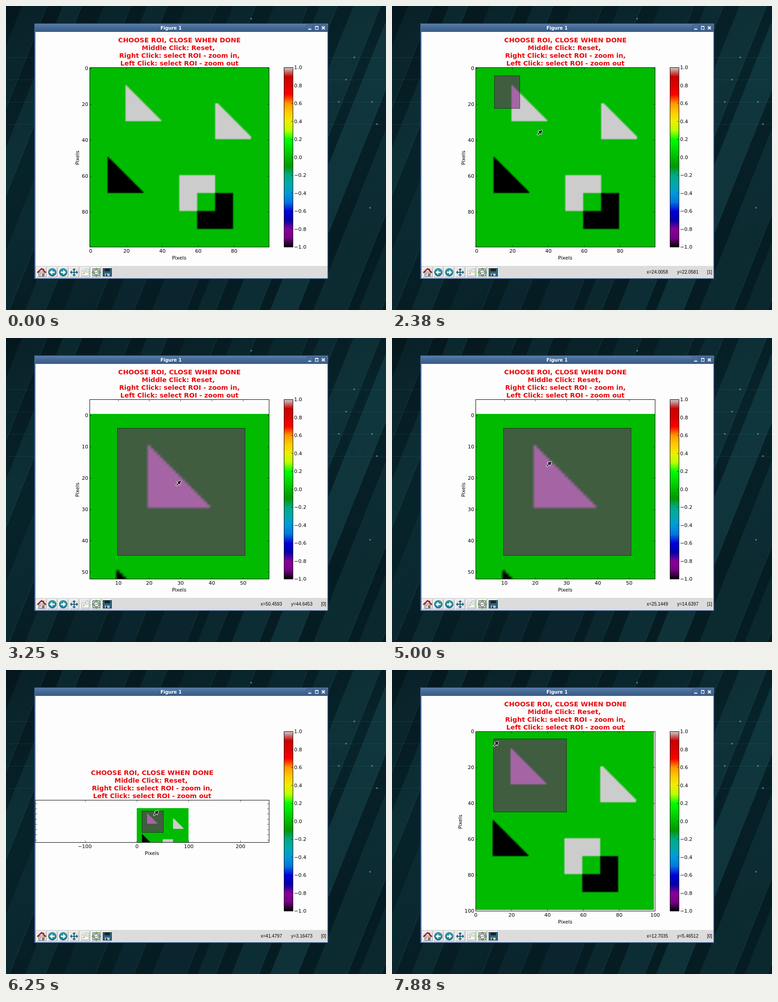
Recreate the animation shown at these times as an HTML page with a canvas. Size 837 by 669 pixels, loop 8000 ms.

```html
<!DOCTYPE html>
<html lang="en">
<head>
<meta charset="utf-8">
<title>Figure 1</title>
<style>
  html, body { margin: 0; width: 100%; height: 100%; overflow: hidden; background: #06191f; }
  canvas { display: block; }
</style>
</head>
<body>
<canvas id="stage" width="837" height="669"></canvas>
<script>
const LOOP = 8000, STEP = 125;
const c = document.getElementById('stage').getContext('2d');
const VERA = '"DejaVu Sans", sans-serif';

// Axes box (l, t, w, h), data origin (x0, y0), pixels per unit (s) and tick spacing
const box = { l: 184.5, t: 135.5, w: 395, h: 395 };
const views = {
  full:  { ...box, x0: -0.5, y0: -0.5, s: 3.95, dx: 20, dy: 20, labelX: 156.5 },
  zoom:  { ...box, x0: 0.92, y0: -5.15, s: 6.885, dx: 10, dy: 10, labelX: 156.5 },
  wide:  { l: 64.5, t: 286.5, w: 515, h: 93, x0: -196.4, y0: -16.7, s: 1.1415, dx: 100, dy: 10, labelX: 20 },
  reset: { ...box, x0: 0, y0: 0, s: 3.95, dx: 20, dy: 20, labelX: 149.5 }
};
const viewAt = t => views[t < 3000 ? 'full' : t < 5500 ? 'zoom' : t < 6625 ? 'wide' : 'reset'];
const toX = (v, x) => v.l + (x - v.x0) * v.s;
const toY = (v, y) => v.t + (y - v.y0) * v.s;

// Pointer stops: time, data position, view it is measured in
const stops = [
  [250, 165, 40, 'full'], [500, 125, 60, 'full'], [875, 125, 60, 'full'],
  [1625, 9.8, 4, 'full'], [1750, 9.8, 4, 'full'], [2125, 24.0058, 22.0581, 'full'],
  [2375, 36.6, 34.3, 'full'], [2750, 50.4593, 44.6453, 'full'],
  [3500, 30.16, 20.75, 'zoom'], [4250, 23, 13.5, 'zoom'], [4375, 23, 13.5, 'zoom'],
  [4500, 24, 14, 'zoom'], [4875, 24, 14, 'zoom'], [5000, 25.1449, 14.6397, 'zoom'],
  [5375, 18.57, 17.29, 'zoom'], [5625, 15.17, -13.64, 'wide'],
  [6250, 41.4797, 3.16473, 'wide'], [6625, 38.36, 43.97, 'reset'],
  [7875, 12.7035, 5.46512, 'reset']
];

function pointerAt(t) {
  const i = stops.findLastIndex(s => s[0] <= t);
  if (i < 0) return null;
  const a = stops[i], b = stops[i + 1];
  // Between stops in different views the pointer rests
  const k = b && b[3] === a[3] ? (t - a[0]) / (b[0] - a[0]) : 0;
  const mix = n => k ? a[n] + (b[n] - a[n]) * k : a[n];
  return { x: mix(1), y: mix(2), view: views[a[3]] };
}

function valueAt(x, y) {
  const within = (a, b, w, h) => x >= a && x < a + w && y >= b && y < b + h;
  let v = 0;
  if (within(20, 10, 20, 20) && x - 20 <= y - 10) v = 1;
  if (within(70, 20, 20, 20) && x - 70 <= y - 19) v = 1;
  if (within(10, 50, 20, 20) && x - 10 <= y - 50) v = -1;
  if (within(50, 60, 20, 20)) v += 1;
  if (within(60, 70, 20, 20)) v -= 1;
  return v;
}

const image = document.createElement('canvas');
image.width = image.height = 100;
const pixels = image.getContext('2d');
for (let y = 0; y < 100; y++) for (let x = 0; x < 100; x++) {
  pixels.fillStyle = ['#000', '#0b0', '#ccc'][valueAt(x, y) + 1];
  pixels.fillRect(x, y, 1, 1);
}

function rect(x, y, w, h, fill) { c.fillStyle = fill; c.fillRect(x, y, w, h); }

function frame(x, y, w, h, color) { c.strokeStyle = color; c.lineWidth = 1; c.strokeRect(x, y, w, h); }

function line(color, width, ...pts) {
  c.strokeStyle = color;
  c.lineWidth = width;
  c.beginPath();
  for (let i = 0; i < pts.length; i += 2) c.lineTo(pts[i], pts[i + 1]);
  c.stroke();
}

function poly(fill, ...pts) {
  c.fillStyle = fill;
  c.beginPath();
  for (let i = 0; i < pts.length; i += 2) c.lineTo(pts[i], pts[i + 1]);
  c.closePath();
  c.fill();
}

function disc(x, y, r, fill) {
  c.fillStyle = fill;
  c.beginPath();
  c.arc(x, y, r, 0, 7);
  c.fill();
}

function text(s, x, y, font, color = '#000', align = 'center') {
  c.font = font;
  c.fillStyle = color;
  c.textAlign = align;
  c.fillText(s, x, y);
}

function gradient(x0, y0, x1, y1, colors) {
  const g = c.createLinearGradient(x0, y0, x1, y1);
  colors.forEach((color, i) => g.addColorStop(i / (colors.length - 1), color));
  return g;
}

function drawWallpaper() {
  rect(0, 0, 837, 669, gradient(0, 0, 200, 669, ['#05171d', '#07232a', '#061c23']));
  // Slanted bands: x at the top edge, width, opacity
  const bands = [[35, 55, .2], [125, 42, .3], [215, 60, .2], [310, 45, .25], [395, 70, .15],
    [500, 50, .2], [590, 75, .2], [690, 40, .25], [765, 60, .35], [850, 60, .45], [945, 75, .3], [1045, 50, .25]];
  for (const [x, w, a] of bands) {
    poly(`rgba(28,78,84,${a})`, x, 0, x + w, 0, x + w - 268, 669, x - 268, 669);
    line('rgba(75,130,135,.25)', 1, x + w, 0, x + w - 268, 669);
  }
  for (const y of [113, 162, 211, 260]) line('rgba(70,120,125,.2)', 1, 0, y + .5, 837, y + .5);
  for (const [x, y] of [[540, 28], [733, 211], [806, 211], [817, 260], [802, 444], [767, 113], [749, 162]])
    disc(x, y, 1.8, '#66858a');
}

function arrowDisc(x, dir) {
  disc(x, 586, 9, '#176b7c');
  disc(x, 585, 7.5, '#2b93a4');
  poly('#fff', x + 6 * dir, 586, x, 580.5, x, 584.5, x - 5 * dir, 584.5, x - 5 * dir, 587.5, x, 587.5, x, 591.5);
}

function drawToolbar() {
  rect(65, 572, 643, 27, '#dcdcdc');
  for (let i = 0; i < 7; i++) {
    rect(67 + 24 * i, 575, 22, 22, '#e6e6e6');
    frame(67.5 + 24 * i, 575.5, 21, 21, '#a8a8a8');
    line('#fff', 1, 67.5 + 24 * i, 597, 67.5 + 24 * i, 575.5, 88 + 24 * i, 575.5);
  }
  rect(72, 585, 13, 10, '#eee8dc');
  frame(72.5, 585.5, 12, 9, '#555');
  rect(80, 588, 3, 6, '#7a4a30');
  rect(74, 588, 4, 3, '#7ba5c8');
  rect(82, 578, 2, 5, '#a22');
  line('#a01c24', 3, 69, 587, 78.5, 578, 88, 587);
  arrowDisc(102, -1);
  arrowDisc(126, 1);
  line('#175b7c', 2, 143, 586, 157, 586);
  line('#175b7c', 2, 150, 579, 150, 593);
  for (const [dx, dy] of [[1, 0], [-1, 0], [0, 1], [0, -1]])
    poly('#175b7c', 150 + 9 * dx, 586 + 9 * dy, 150 + 5 * dx + 4 * dy, 586 + 5 * dy + 4 * dx,
      150 + 5 * dx - 4 * dy, 586 + 5 * dy - 4 * dx);
  rect(166, 583, 17, 11, '#f6f6f0');
  frame(166.5, 583.5, 16, 10, '#b4b4b4');
  line('#c3a55b', 2, 169, 590, 174, 586);
  disc(179, 582, 4.5, '#9cc4bc');
  disc(179, 582, 3.5, '#d8eee6');
  rect(191, 578, 16, 16, '#fff');
  frame(191.5, 578.5, 15, 15, '#222');
  frame(194.5, 581.5, 9, 9, '#333');
  line('#356', 1, 195, 589, 198, 585, 200, 587, 204, 582);
  for (const d of [-1, 1]) {
    poly('#3ba51c', 199 + 10 * d, 586, 199 + 6 * d, 582, 199 + 6 * d, 590);
    poly('#3ba51c', 199, 586 + 10 * d, 195, 586 + 6 * d, 203, 586 + 6 * d);
  }
  rect(213, 577, 20, 18, '#12333f');
  rect(214, 578, 18, 16, '#2c6680');
  rect(217, 578, 12, 6, '#1c2428');
  rect(218, 589, 10, 5, '#c4ced2');
  rect(220, 590, 3, 4, '#234');
}

function drawWindow() {
  rect(62, 38, 648, 563, '#24406a');
  rect(63, 39, 646, 561, '#5878a4');
  rect(64, 40, 645, 17, gradient(0, 40, 0, 57, ['#587daa', '#426791', '#3a5b86']));
  text('Figure 1', 363.5, 52, `bold 10px ${VERA}`, '#fff');
  for (const x of [662, 677, 692]) {
    rect(x, 41, 14, 14, '#4a6e9b');
    frame(x + .5, 41.5, 13, 13, '#355680');
  }
  rect(666, 50, 6, 2, '#fff');
  frame(681.5, 45.5, 6, 6, '#fff');
  line('#fff', 2, 681, 45, 688, 45);
  line('#fff', 2, 696, 45, 702, 51);
  line('#fff', 2, 702, 45, 696, 51);
  rect(65, 57, 643, 515, '#fdfdfd');
  drawToolbar();
}

function drawColorbar() {
  const spectral = '000 708 809 00a 00d 07d 09d 0aa 0a8 090 0b0 0d0 0f0 bf0 ee0 fc0 f90 f00 d00 c00 ccc';
  rect(612, 135.5, 20, 395, gradient(0, 530.5, 0, 135.5, spectral.split(' ').map(h => '#' + h)));
  frame(612.5, 135.5, 19.5, 395, '#000');
  for (let i = -5; i <= 5; i++) {
    const y = 333 - i * 39.5;
    line('rgba(0,0,0,.6)', 1, 628, y, 632, y);
    text((i / 5).toFixed(1).replace('-', '\u2212'), 634.5, y + 3.5, `11.1px ${VERA}`, '#000', 'left');
  }
}

function drawRoi(t, v) {
  if (t <= 2000) return;
  const end = t < 3000 ? pointerAt(t - 250) : { x: 50.4593, y: 44.6453 };
  const x = Math.floor(toX(v, 9.8)) + .5, y = Math.floor(toY(v, 4)) + .5;
  const w = Math.round(toX(v, end.x)) + .5 - x, h = Math.round(toY(v, end.y)) + .5 - y;
  rect(x, y, w, h, 'rgba(128,0,128,.5)');
  frame(x, y, w, h, 'rgba(0,0,0,.55)');
}

function drawAxes(t, v) {
  const { l, w, h } = v, top = v.t, r = l + w, b = top + h, font = `11.1px ${VERA}`;
  c.save();
  c.beginPath();
  c.rect(l, top, w, h);
  c.clip();
  rect(l, top, w, h, '#fdfdfd');
  c.drawImage(image, Math.floor(toX(v, -.5)), Math.floor(toY(v, -.5)), 100 * v.s, 100 * v.s);
  drawRoi(t, v);
  c.restore();

  c.save();
  c.beginPath();
  c.rect(64, 57, 644, 515);
  c.clip();
  frame(l, top, w, h, '#000');
  const label = n => String(n).replace('-', '\u2212');
  const tickColor = 'rgba(0,0,0,.6)';
  for (let n = Math.ceil(v.x0 / v.dx) * v.dx; toX(v, n) <= r + .1; n += v.dx) {
    const x = Math.round(toX(v, n) - .5) + .5;
    line(tickColor, 1, x, b, x, b - 4);
    line(tickColor, 1, x, top, x, top + 4);
    text(label(n), n < 0 ? x - 1 : x, b + 12.5, font);
  }
  for (let n = Math.ceil(v.y0 / v.dy) * v.dy; toY(v, n) <= b + .1; n += v.dy) {
    const y = Math.round(toY(v, n) - .5) + .5;
    line(tickColor, 1, l, y, l + 4, y);
    line(tickColor, 1, r, y, r - 4, y);
    text(label(n), l - 3.5, y + 3.5, font, '#000', 'right');
  }
  const mid = l + w / 2;
  text('Pixels', mid - .5, b + 27, font);
  c.translate(v.labelX + 4, top + h / 2 + 1);
  c.rotate(-Math.PI / 2);
  text('Pixels', 0, 0, font);
  c.restore();

  ['CHOOSE ROI, CLOSE WHEN DONE', 'Middle Click: Reset, ', 'Right Click: select ROI - zoom in,',
    'Left Click: select ROI - zoom out'].forEach((s, i) =>
    text(s, mid, top - 5 - 16.8 * (3 - i), `bold 14.45px ${VERA}`, '#e8090d'));
}

function drawStatus(t) {
  // Readout trails the pointer while dragging
  const p = pointerAt(t > 1625 && t < 3000 ? t - 250 : t);
  if (!p) return;
  const { x, y, view: v } = p;
  if (x < v.x0 || y < v.y0 || x > v.x0 + v.w / v.s || y > v.y0 + v.h / v.s) return;
  const font = '10px "Liberation Sans", sans-serif', short = n => Number(n.toPrecision(6));
  text('x=' + short(x), 561, 589, font, '#000', 'left');
  text('y=' + short(y), 628, 589, font, '#000', 'left');
  const col = Math.round(x), row = Math.round(y);
  if (col >= 0 && col < 100 && row >= 0 && row < 100)
    text(`[${valueAt(col, row)}]`, 705, 589, font, '#000', 'right');
}

function drawPointer(t) {
  const p = pointerAt(t);
  if (!p) return;
  c.save();
  c.translate(toX(p.view, p.x), toY(p.view, p.y));
  const shape = [0, 0, -9, 3, -6, 5, -11, 9.5, -9.5, 11, -5, 6.5, -3, 9];
  c.lineJoin = 'round';
  line('#fff', 2, ...shape, 0, 0);
  poly('#000', ...shape);
  c.restore();
}

function draw(now) {
  const t = Math.floor((now % LOOP) / STEP) * STEP;
  drawWallpaper();
  drawWindow();
  drawColorbar();
  drawAxes(t, viewAt(t));
  drawStatus(t);
  drawPointer(t);
}

let start;
function tick(now) {
  start ??= now;
  draw(now - start);
  requestAnimationFrame(tick);
}
draw(0);
requestAnimationFrame(tick);
</script>
</body>
</html>
```
